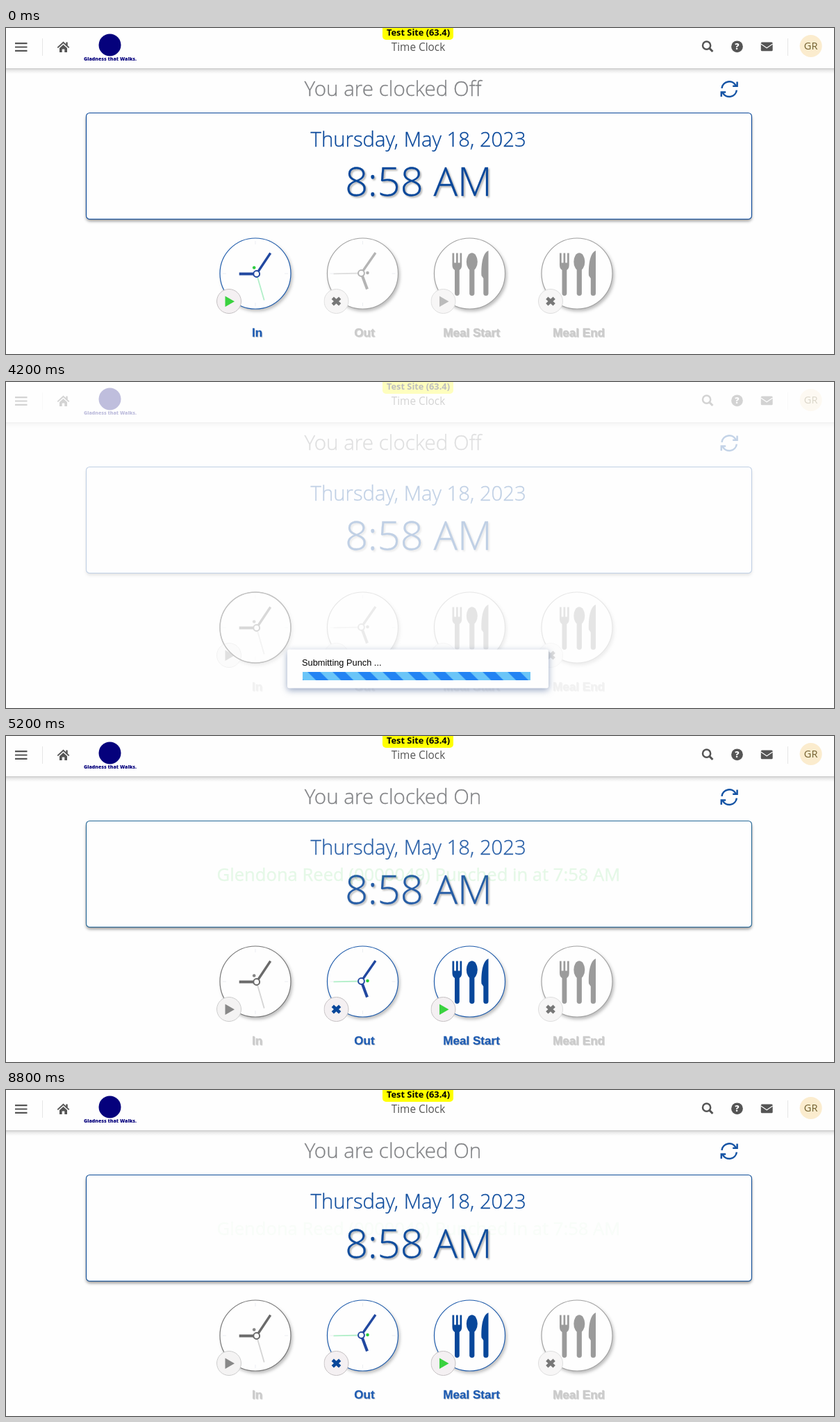
An HTML page for the animation above (9000 ms loop, 1192 by 470 pixels).

```html
<!DOCTYPE html>
<html lang="en">
<head>
<meta charset="utf-8">
<title>Time Clock</title>
<style>
html, body { margin: 0; width: 100%; height: 100%; overflow: hidden; background: #fefefe; }
svg { display: block; width: 1192px; height: 470px; }
text { font-family: "Open Sans", sans-serif; }
.mid { text-anchor: middle; }
.light { font-weight: 300; }
.label { font: bold 17.1px "Liberation Sans", Arial, sans-serif; text-anchor: middle; stroke-width: .3; filter: drop-shadow(1px 1px 0 rgba(0,0,0,.16)); }
.time { filter: drop-shadow(2px 2px 1px rgba(0,0,0,.3)); }
.face { fill: #fefefe; filter: drop-shadow(2px 3px 2px rgba(0,0,0,.25)); }

/* Button palettes */
.act { --rim: #1f5cac; --hand: #2148a0; --sec: #b2efc9; --dot: #2ecc40; --icon: #08479a; --mark: #08479a; --play: #3ad23f; --badge: #f4f0f2; --edge: #c4c0c2; --label: #1f5cb2; }
.dim { --rim: #a2a2a2; --hand: #b4b4b4; --sec: #dedede; --dot: #b0b0b0; --icon: #9b9b9b; --mark: #777; --play: #bbb; --badge: #f7f6f6; --edge: #dedede; --label: #cbcbcb; }
.done { --rim: #777; --hand: #6a6a6a; --sec: #d4d4d4; --dot: #858585; --mark: #777; --play: #888; --badge: #f4f3f3; --edge: #ccc; --label: #cbcbcb; }

/* One 9 s loop, shown five times a second */
.off, .on, .ready, .sent, .hover, .sending, .now, .msg { animation: 9s infinite step-end; }
.off { animation-name: off; }
.on { animation-name: on; }
.ready { animation-name: ready; }
.sent { animation-name: sent; }
.hover { animation-name: hover; }
.sending { animation-name: sending; }
.now { animation-name: now; }
.msg { animation-name: msg; }
@keyframes off { 0% { opacity: 1 } 57.7%, 100% { opacity: 0 } }
@keyframes on { 0% { opacity: 0 } 57.7%, 100% { opacity: 1 } }
@keyframes ready { 0% { opacity: 1 } 44.4%, 100% { opacity: 0 } }
@keyframes sent { 0% { opacity: 0 } 44.4%, 100% { opacity: 1 } }
@keyframes hover { 0% { opacity: 0 } 26.6% { opacity: 1 } 44.4%, 100% { opacity: 0 } }
@keyframes sending { 0% { opacity: 0 } 44.4% { opacity: 1 } 57.7%, 100% { opacity: 0 } }
@keyframes now {
  0% { opacity: 1 } 57.7% { opacity: .88 } 60% { opacity: .41 } 62.2% { opacity: .03 } 64.4% { opacity: 0 }
  93.3% { opacity: .12 } 95.5% { opacity: .59 } 97.7%, 100% { opacity: .97 }
}
@keyframes msg {
  0% { opacity: 0 } 57.7% { opacity: .12 } 60% { opacity: .59 } 62.2% { opacity: .97 } 64.4% { opacity: 1 }
  93.3% { opacity: .88 } 95.5% { opacity: .41 } 97.7%, 100% { opacity: .03 }
}
.bar { animation: slide 1s infinite steps(5); }
@keyframes slide { to { transform: translateX(36px) } }
</style>
</head>
<body>
<svg viewBox="0 0 1192 470">
  <defs>
    <pattern id="stripes" width="36" height="12" x="427" y="418" patternUnits="userSpaceOnUse">
      <rect width="36" height="12" fill="#6ac5f8"/>
      <path d="M0 0H18L30 12H12Z" fill="#2283f3"/>
    </pattern>
    <linearGradient id="edge" x2="0" y2="1">
      <stop offset="0" stop-color="#000" stop-opacity=".2"/>
      <stop offset=".4" stop-color="#000" stop-opacity=".08"/>
      <stop offset="1" stop-color="#000" stop-opacity="0"/>
    </linearGradient>
    <clipPath id="track"><rect x="427" y="418" width="328" height="12"/></clipPath>
    <rect id="frame" x="115.5" y="122.5" width="958" height="153" rx="5"/>
    <g id="arrow">
      <path d="M1030.5 86.8A10.8 10.8 0 0 1 1050.8 83.2"/>
      <path d="M1052.6 77.4V83.8H1046.2"/>
    </g>
  </defs>

  <rect y="58" width="1192" height="8" fill="url(#edge)"/>
  <rect width="1192" height="58" fill="#fefefe"/>

  <g fill="#555">
    <path d="M13 21h17.5v2.2H13zM13 26.4h17.5v2.2H13zM13 31.8h17.5V34H13z"/>
    <path d="M77 29 82.5 24 88 29V35H84.3V30.5H80.7V35H77ZM86.3 20.5h2.4v5h-2.4z"/>
    <path d="M74.3 28.4 82.5 20.8 90.7 28.4" fill="none" stroke="#555" stroke-width="1.9"/>
    <g fill="none" stroke="#555" stroke-width="2.5">
      <circle cx="1008.6" cy="25.2" r="5.6"/>
      <path d="M1012.8 29.4 1017.4 34" stroke-width="3"/>
    </g>
    <circle cx="1052.5" cy="26.8" r="8.4"/>
    <rect x="1086.8" y="20.6" width="16.9" height="12.6" rx="1.5"/>
    <path d="M1086.8 23 1095.2 28.8 1103.7 23" fill="none" stroke="#fefefe" stroke-width="1.1"/>
    <text class="mid" x="1052.5" y="31.3" font-size="12.5" font-weight="800" fill="#fefefe">?</text>
    <text class="mid" x="593.5" y="33" font-size="15.36">Time Clock</text>
  </g>
  <path d="M52.5 15V40M1125.5 15V40" stroke="#e6e6e6"/>
  <circle cx="149.5" cy="24.5" r="16" fill="#05017c"/>
  <text class="mid" x="150" y="47" font-size="7" font-weight="800" fill="#05017c">Gladness that Walks.</text>
  <path d="M542 0H644V12a5 5 0 0 1-5 5H547a5 5 0 0 1-5-5Z" fill="#ff0"/>
  <text class="mid" x="593.5" y="11.4" font-size="12.8" font-weight="700">Test Site (63.4)</text>
  <circle cx="1158.7" cy="26" r="16" fill="#fbecce"/>
  <text class="mid" x="1158.7" y="31.2" font-size="14.6" fill="#71602f">GR</text>

  <g class="mid light" font-size="29.6" fill="#808285" stroke="#808285" stroke-width=".3">
    <text class="off" x="557" y="97.5">You are clocked Off</text>
    <text class="on" x="557" y="97.5">You are clocked On</text>
  </g>
  <g fill="none" stroke="#1453a4" stroke-width="2.5">
    <use href="#arrow"/>
    <use href="#arrow" transform="rotate(180 1041.2 88.2)"/>
  </g>

  <use href="#frame" fill="#fefefe" style="filter:drop-shadow(0 3px 2px rgba(0,0,0,.42))"/>
  <g class="now mid light" fill="#08479a" stroke="#08479a" stroke-width=".3">
    <use href="#frame" fill="none" stroke-width="1.1"/>
    <text x="593.7" y="171" font-size="29.3">Thursday, May 18, 2023</text>
    <text class="time" x="594" y="241.5" font-size="57.6">8:58 AM</text>
  </g>
  <g class="msg mid" fill="#2ecc40" stroke="#2ecc40" stroke-width=".4">
    <use href="#frame" fill="none" stroke-width="1.1"/>
    <text x="594" y="208.7" font-size="25.6">Glendona Reed (0000049) Punched in at 7:58 AM</text>
  </g>

  <g id="buttons"></g>

  <g class="hover" transform="translate(365 396)" fill="#fff" stroke="#222" stroke-linejoin="round">
    <path d="M4.6 10V2.3a1.5 1.5 0 0 1 3 0V7a1.3 1.3 0 0 1 2.6.3a1.3 1.3 0 0 1 2.5.5a1.2 1.2 0 0 1 2.3.6V12c0 2-1 2.8-1.2 5H7.2C6.5 14.5 4 13 2.3 10.2c-.8-1.4.9-2.3 2.3-.6Z"/>
    <path d="M8.5 11v3.5M10.5 11v3.5M12.5 11v3.5" stroke-width=".8"/>
  </g>

  <g class="sending">
    <rect width="1192" height="470" fill="#fefefe" fill-opacity=".75"/>
    <rect x="405" y="385.5" width="376" height="56" rx="3" fill="#fefefe" style="filter:drop-shadow(0 3px 5px rgba(50,80,135,.5))"/>
    <text x="426" y="409" style="font:12.8px 'Liberation Sans',Arial,sans-serif">Submitting Punch ...</text>
    <g clip-path="url(#track)"><rect class="bar" x="391" y="418" width="364" height="12" fill="url(#stripes)"/></g>
  </g>
</svg>
<script>
const line = (d, color, width) => `<path d="${d}" fill="none" stroke="var(--${color})" stroke-width="${width}"/>`;

// Hands are drawn from a pivot given relative to the face centre
const clock = (px, py, hour, minute, second, dot) => `
  <path d="M0-47v5M0 42v5M-47 0h5M42 0h5" stroke="#eceef2"/>
  <g transform="translate(${px} ${py})">
    ${line('M0 0L' + second, 'sec', 1.8)}${line('M0 0L' + hour, 'hand', 4)}${line('M0 0L' + minute, 'hand', 3.4)}
    <circle cx="${dot[0]}" cy="${dot[1]}" r="2.3" fill="var(--dot)"/>
    <circle r="4.4" fill="#fefefe" stroke="var(--hand)" stroke-width="2"/>
  </g>`;

const meal = `<g fill="var(--icon)">
  <path d="M-25-29.5h2.7v14h2.8v-14h2.7v14h2.8v-14h2.7V-12c0 4-2 6-3.4 7V28.5a3.4 3.4 0 0 1-6.8 0V-5c-1.5-1-3.5-3-3.5-7Z"/>
  <ellipse cx="3.3" cy="-17" rx="8" ry="12.8"/>
  <rect x="-.3" y="-9" width="7.2" height="41" rx="3.4"/>
  <path d="M27-33V28.5a3.6 3.6 0 0 1-7.2 0V7L17 3C16.4-14 19-30 27-33Z"/></g>`;

const inFace = clock(1.7, .5, '-25 0', '20-30', '11 38', [-3.5, -9]);
const outFace = clock(-2, -.5, '8.5 23', '20.5-29.5', '-40 .8', [9, -.5]);
const play = '<path d="M-43.5 32.5V48L-30 40.2Z" fill="var(--play)"/>';
const cross = line('M-43.2 35.2l10.4 9.6M-32.8 35.2l-10.4 9.6', 'mark', 4.8);

const button = (cls, x, face, mark, label, big = 0) => `
  <g class="${cls}" transform="translate(${x} 354)">
    <circle class="face" r="${51 + big}" stroke="var(--rim)" stroke-width="${1.2 + big * 1.8}"/>
    ${face}
    <circle cx="-38" cy="40" r="${17.5 + big * .6}" fill="var(--badge)" stroke="var(--edge)" stroke-width="${1 + big * .6}"/>
    ${mark}
    <text class="label" x="2.5" y="91" fill="var(--label)" stroke="var(--label)">${label}</text>
  </g>`;

document.getElementById('buttons').innerHTML =
  button('act ready', 359, inFace, play, 'In') +
  button('act hover', 359, inFace, play, 'In', 1) +
  button('done sent', 359, inFace, play, 'In') +
  '<circle class="sending" cx="359" cy="354" r="51" fill="none" stroke="#111" stroke-width="1.5"/>' +
  button('dim off', 513.5, outFace, cross, 'Out') +
  button('act on', 513.5, outFace, cross, 'Out') +
  button('dim off', 667.5, meal, play, 'Meal Start') +
  button('act on', 667.5, meal, play, 'Meal Start') +
  button('dim', 822, meal, cross, 'Meal End');
</script>
</body>
</html>
```
